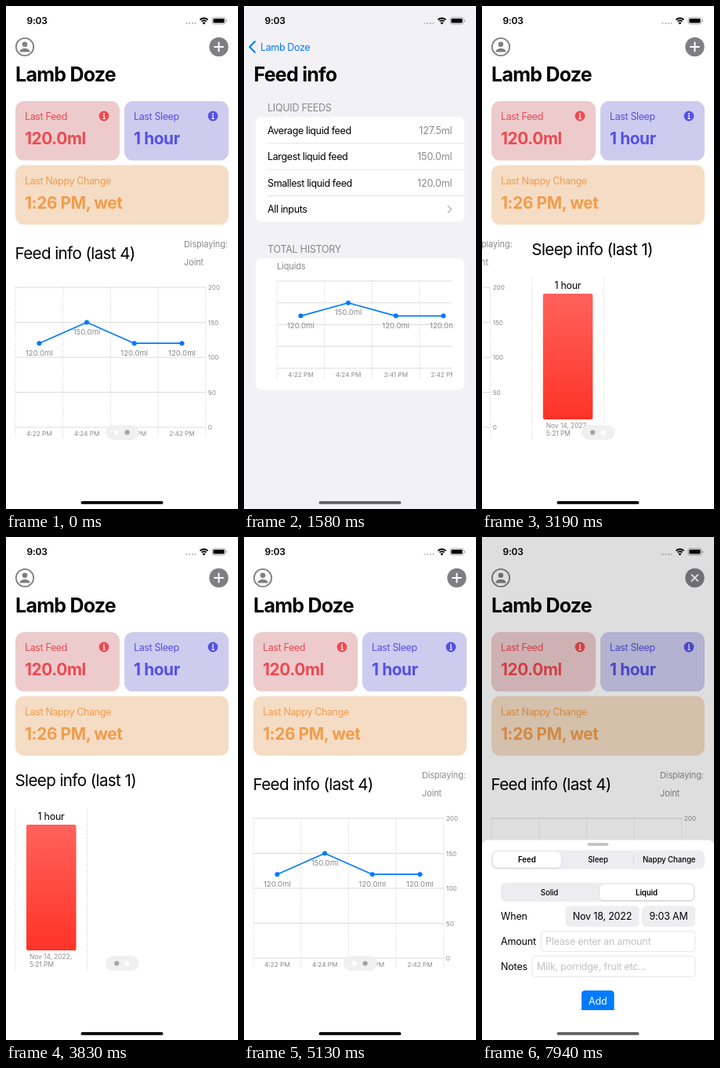
An HTML page that plays this animation: 296 px wide and 640 px high, repeating every 8000 ms.

```html
<!DOCTYPE html>
<html lang="en">
<head>
<meta charset="utf-8">
<title>Baby tracker</title>
<style>
  html, body { margin: 0; width: 100%; height: 100%; overflow: hidden; background: #fff; }
  svg { display: block; width: 296px; height: 640px; font-family: Inter, "Liberation Sans", sans-serif; }
  text { white-space: pre; }
</style>
</head>
<body>
<svg id="stage" viewBox="0 0 296 640"></svg>
<script>
const LOOP = 8000, W = 296, H = 640;
const APP = 'Lamb Doze';
const BLUE = '#007aff', GRAY = '#8a8a8e', ICON = '#7f7f82';
const RED = '#ec4a50', INDIGO = '#5550e2', ORANGE = '#f09d4c';

// Drawing helpers
const text = (x, y, str, size, { fill = '#000', weight = 400, anchor = 'start', track = -0.03 } = {}) =>
  `<text x="${x}" y="${y}" font-size="${size}" fill="${fill}" font-weight="${weight}" text-anchor="${anchor}" letter-spacing="${(track * size).toFixed(3)}">${str}</text>`;
const rect = (x, y, w, h, r, fill, extra = '') =>
  `<rect x="${x}" y="${y}" width="${w}" height="${h}" rx="${r}" fill="${fill}" ${extra}/>`;
const circle = (x, y, r, fill, extra = '') =>
  `<circle cx="${x}" cy="${y}" r="${r}" fill="${fill}" ${extra}/>`;
const stroke = (d, color, width, extra = '') =>
  `<path d="${d}" fill="none" stroke="${color}" stroke-width="${width}" ${extra}/>`;
const group = (id, body, extra = '') => `<g id="${id}" ${extra}>${body}</g>`;
const dotted = (x, y1, y2) => stroke(`M${x} ${y1}V${y2}`, '#cfcfd1', 0.8, 'stroke-dasharray="1.5 1.5"');
const round = 'stroke-linecap="round" stroke-linejoin="round"';

function statusBar() {
  const cells = [230.5, 234.3, 238, 241.5].map(x => circle(x, 22, 1.1, '#b4b4b6')).join('');
  const wifi = [[6.9, 2], [4.1, 1.9]].map(([r, w]) => {
    const d = r * 0.72;
    return stroke(`M${252.5 - d} ${22.6 - d}A${r} ${r} 0 0 1 ${252.5 + d} ${22.6 - d}`, '#000', w);
  }).join('') + '<path d="M252.5 23.6L250.5 21.4A2.8 2.8 0 0 1 254.5 21.4Z"/>';
  const battery = rect(263, 14.6, 17, 8.4, 2.5, 'none', 'stroke="#a2a2a4" stroke-width=".9"') +
    rect(264.4, 16, 14.2, 5.6, 1.4, '#000') + rect(281, 17.3, 1.1, 3, 0.6, '#a2a2a4');
  return text(26.5, 23.3, '9:03', 12, { weight: 600, track: -0.02 }) + cells + wifi + battery;
}

function card(x, y, w, bg, color, label, value, info) {
  const badge = info ? circle(info, y + 19, 6.4, color) + circle(info, y + 16, 0.95, '#fff') +
    stroke(`M${info - 1.2} ${y + 18.4}h1.4v4M${info - 1.6} ${y + 22.4}h3.4`, '#fff', 1.1) : '';
  return rect(x, y, w, 75.6, 11, bg) +
    text(x + 12, y + 24.4, label, 12.5, { fill: color }) +
    text(x + 12, y + 55.2, value, 20.8, { fill: color, weight: 700, track: -0.018 }) + badge;
}

// Line chart: left edge, top, height of one 50 ml band
function lineChart(left, top, band, labelled) {
  const gap = 60.7, right = left + gap * 4, zero = top + band * 4;
  const data = [['4:22 PM', 120], ['4:24 PM', 150], ['2:41 PM', 120], ['2:42 PM', 120]];
  let out = '';
  for (let i = 0; i <= 4; i++) {
    const y = top + band * i;
    out += stroke(`M${left} ${y}H${right}`, '#d4d4d6', 0.8) + dotted(left + gap * i, top, zero + 14);
    if (labelled) out += text(right + 3, y + 3, 200 - 50 * i, 8.2, { fill: GRAY, track: 0 });
  }
  const pts = data.map(([, v], i) => [left + gap * (i + 0.5), zero - v / 50 * band]);
  out += stroke('M' + pts.map(p => p.join(' ')).join('L'), BLUE, 1.7, round);
  data.forEach(([time, v], i) => {
    const [x, y] = pts[i];
    out += circle(x, y, 3, BLUE) +
      text(x, y + 15.6, v.toFixed(1) + 'ml', 9.6, { fill: GRAY, anchor: 'middle', track: 0 }) +
      text(x, zero + 11, time, 8.2, { fill: GRAY, anchor: 'middle', track: 0 });
  });
  return out;
}

function feedPage() {
  const side = { fill: GRAY, track: -0.01 };
  return text(11.5, 322, 'Feed info (last 4)', 20.6, { track: -0.03 }) +
    text(227, 307.3, 'Displaying:', 11, side) + text(227, 329.6, 'Joint', 11, side) +
    lineChart(12, 358, 44.5, true);
}

function sleepPage() {
  const small = { fill: GRAY, track: 0 };
  return `<g transform="translate(${W})">` +
    text(11.5, 317, 'Sleep info (last 1)', 20.6, { track: -0.03 }) +
    dotted(12, 347, 552) + dotted(103.5, 347, 552) +
    text(57.5, 360, '1 hour', 12.4, { anchor: 'middle', track: -0.02 }) +
    rect(26, 366, 63.5, 160, 2, 'url(#bar)') +
    text(30, 537.3, 'Nov 14, 2022,', 8.3, small) + text(30, 547, '5:21 PM', 8.3, small) + '</g>';
}

function home() {
  return rect(0, 0, W, H, 0, '#fff') +
    card(12, 121, 133, '#edcbcd', RED, 'Last Feed', '120.0ml', 125) +
    card(151, 121, 133, '#cdccef', INDIGO, 'Last Sleep', '1 hour', 264) +
    card(12, 202.6, 272, '#f5dcc4', ORANGE, 'Last Nappy Change', '1:26 PM, wet') +
    group('pager', feedPage() + sleepPage()) +
    rect(127, 533, 42.5, 19, 9.5, '#f0f0f1') +
    circle(141.2, 542.5, 3.1, '#fff', 'id="dot0"') + circle(154.6, 542.5, 3.1, '#fff', 'id="dot1"');
}

function detail() {
  const rows = ['Average liquid feed', 'Largest liquid feed', 'Smallest liquid feed', 'All inputs'];
  const values = ['127.5ml', '150.0ml', '120.0ml'];
  const head = { fill: '#85858b', track: -0.02 };
  const list = rows.map((label, i) => {
    const y = 163 + i * 33.4;
    const tail = values[i]
      ? text(265.5, y, values[i], 12.5, { fill: GRAY, anchor: 'end', track: -0.01 }) +
        stroke(`M30 ${y + 11.7}H281`, '#dcdcdf', 0.8)
      : stroke(`M260.3 ${y - 9}l4 4.4l-4 4.4`, '#bfbfc3', 1.6, round);
    return text(30, y, label, 12.5) + tail;
  }).join('');
  return rect(0, 0, W, H, 0, '#f2f2f6') +
    text(12.5, 96.4, 'Feed info', 25, { weight: 700 }) +
    text(30, 133.8, 'LIQUID FEEDS', 12.5, head) + rect(15, 141, 266, 134, 8, '#fff') + list +
    text(30, 313.8, 'TOTAL HISTORY', 12.5, head) + rect(15, 321, 266, 168, 8, '#fff') +
    text(42, 335, 'Liquids', 11, { fill: GRAY, track: -0.01 }) +
    `<g clip-path="url(#chartClip)">${lineChart(42, 350, 27.7, false)}</g>`;
}

function navBar() {
  const person = circle(24, 52, 11.2, 'none', `stroke="${ICON}" stroke-width="1.8"`) +
    circle(24, 48.8, 3.3, ICON) + `<path d="M17.3 58.4C18 52.6 30 52.6 30.7 58.4Z" fill="${ICON}"/>`;
  const plus = group('plus', circle(0, 0, 12.2, ICON) + stroke('M-5.5 0H5.5M0 -5.5V5.5', '#fff', 2, round));
  return group('items', person + plus) +
    group('bigTitle', text(0, 0, APP, 25, { weight: 700 })) +
    group('backLabel', text(0, 0, APP, 12.5, { fill: BLUE })) +
    stroke('M13.8 45.2L7.2 52L13.8 58.8', BLUE, 2.1, `id="chevron" ${round}`);
}

function segments(x, y, w, labels, chosen) {
  const cell = w / labels.length;
  return rect(x, y, w, 24, 7, '#ededf0') +
    rect(x + cell * chosen + 2, y + 2, cell - 4, 20, 5.5, '#fff', 'filter="url(#lift)"') +
    labels.map((s, i) => text(x + cell * (i + 0.5), y + 15.5, s, 9.7,
      { anchor: 'middle', weight: i === chosen ? 600 : 500, track: -0.01 })).join('');
}

function sheet() {
  const label = { track: -0.012 };
  const hint = { fill: '#c1c1c4', track: -0.018 };
  const mid = { anchor: 'middle', track: -0.015 };
  const field = (x, y) => rect(x, y, 272 - x, 26, 4, '#fff', 'stroke="#e6e6e8" stroke-width=".9"');
  return `<path d="M0 ${H}V8Q0 0 8 0H288Q296 0 296 8V${H}Z" fill="#fff"/>` +
    rect(134.5, 3.8, 27, 3.6, 1.8, '#c2c2c5') +
    segments(12, 13, 272, ['Feed', 'Sleep', 'Nappy Change'], 0) +
    stroke('M193.3 19.5V31', '#d3d3d6', 0.8) +
    segments(24, 54.6, 248, ['Solid', 'Liquid'], 1) +
    text(24, 101.4, 'When', 12.5, label) +
    rect(106.5, 84, 94, 26.4, 5, '#eeeef0') + text(153.5, 101.4, 'Nov 18, 2022', 12.5, mid) +
    rect(204, 84, 68, 26.4, 5, '#eeeef0') + text(238, 101.4, '9:03 AM', 12.5, mid) +
    text(24, 133.6, 'Amount', 12.5, label) + field(75.5, 116) + text(81, 133.6, 'Please enter an amount', 12.5, hint) +
    text(24, 165.4, 'Notes', 12.5, label) + field(64, 147.8) + text(70, 165.4, 'Milk, porridge, fruit etc...', 12.5, hint) +
    `<path d="M127 216.5V196q0 -4.6 4.6 -4.6H164q4.6 0 4.6 4.6V216.5Z" fill="${BLUE}"/>` +
    text(147.8, 209, 'Add', 12.5, { ...mid, fill: '#fff' });
}

document.getElementById('stage').innerHTML = `<defs>
  <linearGradient id="bar" x1="0" y1="0" x2="0" y2="1"><stop stop-color="#ff625b"/><stop offset="1" stop-color="#ff3328"/></linearGradient>
  <clipPath id="chartClip"><rect x="40" y="340" width="226" height="145"/></clipPath>
  <filter id="lift" x="-10%" y="-30%" width="120%" height="170%"><feDropShadow dx="0" dy="1" stdDeviation="1.2" flood-opacity=".14"/></filter>
</defs>` +
  group('home', home()) + rect(0, 0, W, H, 0, '#000', 'id="pushDim"') +
  group('detail', detail()) + navBar() + statusBar() +
  rect(0, 0, W, H, 0, '#000', 'id="sheetDim"') + group('sheet', sheet()) +
  rect(95.5, 630, 105, 3.8, 1.9, '#000', 'id="homeBar"');

// Motion
const $ = id => document.getElementById(id);
const clamp = v => Math.max(0, Math.min(1, v));
const mix = (a, b, k) => a + (b - a) * k;
const smooth = v => { const k = clamp(v); return k * k * (3 - 2 * k); };
const move = (id, x, y, more = '') => $(id).setAttribute('transform', `translate(${x.toFixed(2)} ${y.toFixed(2)}) ${more}`);
const fade = (id, a) => $(id).setAttribute('opacity', clamp(a).toFixed(3));

// Critically damped spring from 0 to 1
function spring(t, start, speed) {
  const x = Math.max(0, t - start) * speed;
  const p = 1 - (1 + x) * Math.exp(-x);
  return p > 0.993 ? 1 : p;
}

const BURSTS = [[500, 110, 5], [1780, 110, 6], [2830, 111, 10], [4280, 106, 9], [6310, 100, 7]];
function refreshTime(t) {
  const burst = BURSTS.filter(b => b[0] <= t).pop();
  if (!burst) return 0;
  const [start, gap, count] = burst;
  return start + gap * Math.min(count - 1, Math.floor((t - start) / gap));
}

function draw(time) {
  const t = refreshTime(time);
  const push = spring(t, 453, 0.015) - spring(t, 1750, 0.015);
  const page = spring(t, 2790, 0.0085) - spring(t, 4240, 0.0085);
  const rise = spring(t, 6303, 0.015);

  move('home', -89 * push, 0);
  fade('pushDim', 0.1 * push);
  move('detail', W * (1 - push), 0);
  move('pager', -W * page, 0);
  $('dot0').setAttribute('fill', page < 0.5 ? '#fff' : '#a3a3a6');
  $('dot1').setAttribute('fill', page < 0.5 ? '#a3a3a6' : '#fff');

  const x = mix(12, 21, push), y = mix(96.4, 56.5, push), scale = mix(1, 0.5, push);
  const blue = clamp((push - 0.3) / 0.4);
  move('bigTitle', x, y, `scale(${scale})`);
  move('backLabel', x, y, `scale(${scale * 2})`);
  fade('bigTitle', 1 - blue);
  fade('backLabel', blue);
  fade('chevron', (push - 0.9) * 10);
  fade('items', 1 - push);

  move('plus', 271.5, 52, `rotate(${45 * smooth((t - 6200) / 350)})`);
  fade('plus', t < 6310 ? 1 : mix(0.5, 1, clamp((t - 6310) / 250)));
  fade('sheetDim', 0.13 * rise);
  move('sheet', 0, mix(H + 1, 385.5, rise));

  const tone = Math.round(98 * clamp(2 * Math.max(push, rise)));
  $('homeBar').setAttribute('fill', `rgb(${tone},${tone},${tone})`);
}

const origin = performance.now();
function tick() {
  draw((performance.now() - origin) % LOOP);
  requestAnimationFrame(tick);
}
draw(0);
requestAnimationFrame(tick);
</script>
</body>
</html>
```
